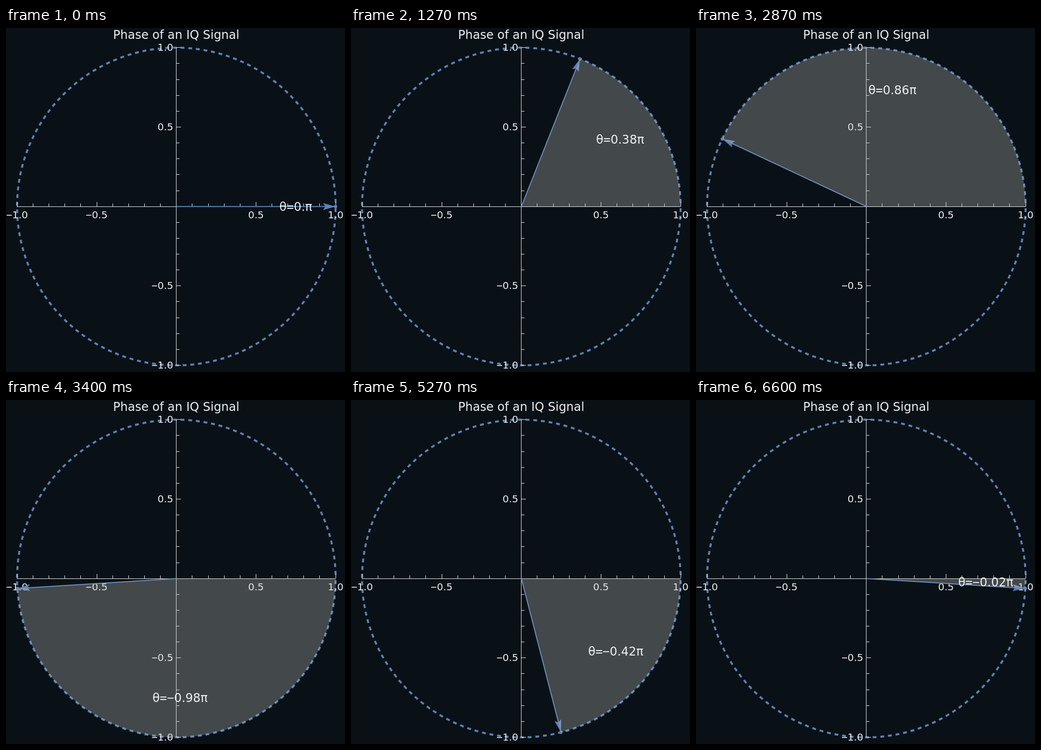
Write an HTML page that moves like this. It is 684 px wide and 696 px high and loops after 6670 ms.

```html
<!DOCTYPE html>
<html lang="en">
<head>
<meta charset="utf-8">
<title>Phase of an IQ Signal</title>
<style>
  html, body { margin: 0; width: 100%; height: 100%; overflow: hidden; background: #0a1116; }
  svg { display: block; width: 684px; height: 696px; }
  text { font-family: "DejaVu Sans", sans-serif; font-size: 20px; fill: #eceef0; text-anchor: middle; }
  .big { font-size: 24px; }
  .op { font-family: "DejaVu Sans Mono", monospace; }
  .end { text-anchor: end; }
  .circle { fill: none; stroke: #5e81b5; stroke-width: 4; stroke-dasharray: 7.75; stroke-dashoffset: 7.75; }
  .axes { fill: none; stroke: #eceef0; stroke-width: 1; shape-rendering: crispEdges; }
  .shaft { stroke: #5e81b5; stroke-width: 2; }
  .head { fill: #5e81b5; }
  .wedge { fill: rgba(198, 199, 197, .3); }
</style>
</head>
<body>
<svg viewBox="0 0 684 696">
  <path class="circle" id="circle"/>
  <path class="axes" id="axes"/>
  <g id="ticks"></g>
  <text class="big" x="343.5" y="22">Phase of an IQ Signal</text>
  <g id="arrow">
    <path class="shaft" d="M0 0H301"/>
    <path class="head" d="M321 0L296 -7L300.5 0L296 7Z"/>
    <circle class="head" cx="321" r="3.5"/>
  </g>
  <path class="wedge" id="wedge"/>
  <text class="big" id="label"></text>
</svg>
<script>
  const CX = 343.73, CY = 361.15, R = 321.4;
  const STEPS = 100, LOOP = 6670;
  const el = id => document.getElementById(id);
  const op = s => `<tspan class="op">${s}</tspan>`;
  const snap = v => Math.floor(v) + 0.5;

  function drawAxes() {
    let path = 'M22 361.5H665M343.5 40V682';
    let labels = '';
    for (let i = -10; i <= 10; i++) {
      if (!i) continue;
      const major = i % 5 === 0;
      const len = major ? 9 : 6;
      const x = CX + R * i / 10, y = CY - R * i / 10;
      path += `M${snap(x)} 361v${-len}M344 ${snap(y)}h${len}`;
      if (major) {
        const text = (i < 0 ? op('\u2212') : '') + Math.abs(i / 10).toFixed(1);
        labels += `<text x="${x}" y="385">${text}</text>`;
        labels += `<text class="end" x="337.5" y="${y + 6.5}">${text}</text>`;
      }
    }
    el('axes').setAttribute('d', path);
    el('ticks').innerHTML = labels;
    el('circle').setAttribute('d',
      `M${CX + R} ${CY}a${R} ${R} 0 0 0 ${-2 * R} 0a${R} ${R} 0 0 0 ${2 * R} 0`);
  }

  function labelText(turn) {
    const n = Math.abs(turn) * 2 / STEPS;
    const sign = turn < 0 ? '\u2212' : '';
    return 'θ' + op('=' + sign) + n + (Number.isInteger(n) ? '.' : '') + 'π';
  }

  function drawStep(step) {
    // Wrap the phase into (-π, π]
    const turn = step > STEPS / 2 ? step - STEPS : step;
    const angle = turn * 2 * Math.PI / STEPS;
    const at = (r, a) => [CX + r * Math.cos(a), CY - r * Math.sin(a)];

    el('arrow').setAttribute('transform',
      `translate(${CX} ${CY}) rotate(${-angle * 180 / Math.PI})`);

    const [tx, ty] = at(R, angle);
    el('wedge').setAttribute('d', turn === 0 ? '' :
      `M${CX} ${CY}H${CX + R}A${R} ${R} 0 0 ${turn > 0 ? 0 : 1} ${tx} ${ty}Z`);

    const [lx, ly] = at(0.75 * R, angle / 2);
    const label = el('label');
    label.setAttribute('x', lx);
    label.setAttribute('y', ly + 8.5);
    label.innerHTML = labelText(turn);
  }

  let shown = -1;
  function tick() {
    // 15 steps per second, held on a 10 ms grid
    const ticks = Math.floor(performance.now() % LOOP / 10);
    const step = Math.min(STEPS - 1, Math.floor((ticks + 0.5) * 0.15));
    if (step !== shown) drawStep(shown = step);
    requestAnimationFrame(tick);
  }

  drawAxes();
  tick();
</script>
</body>
</html>
```
